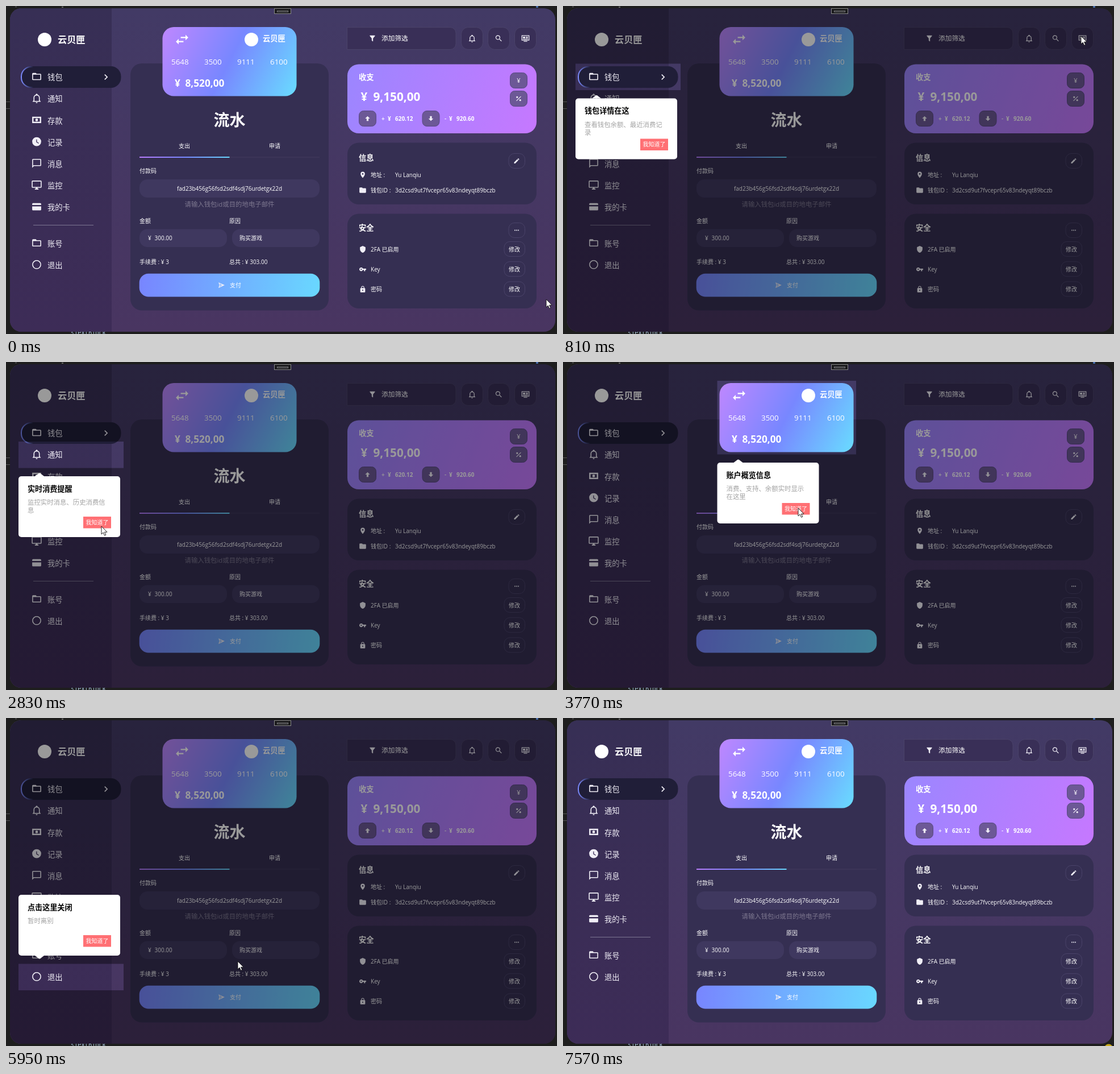
Recreate the animation shown at these times as an HTML page. Size 970 by 577 pixels, loop 7710 ms.

```html
<!DOCTYPE html>
<html lang="zh-CN">
<head>
<meta charset="utf-8">
<style>
html, body { margin: 0; width: 100%; height: 100%; overflow: hidden; background: #1e1e1e; }
svg { display: block; font-family: 'Open Sans', 'Noto Sans CJK SC', 'Noto Sans CJK', sans-serif; white-space: pre; }
</style>
</head>
<body>
<svg id="stage" width="970" height="577" viewBox="0 0 970 577">
  <defs>
    <linearGradient id="win" x2="0" y2="1"><stop stop-color="#423a65"/><stop offset="1" stop-color="#493561"/></linearGradient>
    <linearGradient id="side" x2="0" y2="1"><stop stop-color="#372f55"/><stop offset="1" stop-color="#3d2c57"/></linearGradient>
    <linearGradient id="card" gradientUnits="userSpaceOnUse" x1="275" y1="37" x2="511" y2="158"><stop stop-color="#bf87ff"/><stop offset=".5" stop-color="#7887ff"/><stop offset="1" stop-color="#69dcff"/></linearGradient>
    <linearGradient id="tab"><stop stop-color="#b97dff"/><stop offset=".5" stop-color="#7887ff"/><stop offset="1" stop-color="#69d8ff"/></linearGradient>
    <linearGradient id="pay" gradientUnits="userSpaceOnUse" x1="235" y1="471" x2="552" y2="511"><stop stop-color="#7885ff"/><stop offset="1" stop-color="#69d8ff"/></linearGradient>
    <linearGradient id="flow" gradientUnits="userSpaceOnUse" x1="601" y1="102" x2="934" y2="224"><stop stop-color="#9b86ff"/><stop offset="1" stop-color="#c678ff"/></linearGradient>
    <linearGradient id="edge"><stop stop-color="#7d8cff"/><stop offset=".12" stop-color="#7d8cff" stop-opacity="0"/></linearGradient>
  </defs>
</svg>
<script>
const stage = document.getElementById('stage');
const PANEL = '#352f52', LINE = '#4a4369', LIGHT = '#f1eff7';

function add(tag, attrs, parent = stage) {
  const el = document.createElementNS('http://www.w3.org/2000/svg', tag);
  for (const k in attrs) el.setAttribute(k, attrs[k]);
  parent.append(el);
  return el;
}
const rect = (x, y, width, height, rx, fill, stroke = 'none', parent) =>
  add('rect', { x, y, width, height, rx, fill, stroke }, parent);
// y is the vertical middle of the glyphs
function text(x, y, str, size = 10, weight = 500, fill = '#fff', parent, anchor = 'start') {
  const el = add('text', { x, y: y + size * .37, 'font-size': size, 'font-weight': weight, fill, 'text-anchor': anchor }, parent);
  el.textContent = str;
  return el;
}
const centered = (x, y, str, size, weight, fill) => text(x, y, str, size, weight, fill, stage, 'middle');
// icons live on a 24-unit grid
const icon = (d, cx, cy, size, fill = LIGHT) =>
  add('path', { d, fill, 'fill-rule': 'evenodd', transform: `translate(${cx - size / 2} ${cy - size / 2}) scale(${size / 24})` });

const ICON = {
  folder: 'M10 4H4a2 2 0 0 0-2 2v12a2 2 0 0 0 2 2h16a2 2 0 0 0 2-2V8a2 2 0 0 0-2-2h-8z',
  bell: 'M10 21h4a2 2 0 0 1-4 0M21 19v1H3v-1l2-2v-6c0-3.1 2-5.8 5-6.7V4a2 2 0 0 1 4 0v.3c3 .9 5 3.6 5 6.7v6zM17 11a5 5 0 0 0-10 0v7h10z',
  cash: 'M2 5h20v14H2zM5 8v8h14V8zM12 9a3 3 0 1 1 0 6a3 3 0 0 1 0-6z',
  clock: 'M12 2a10 10 0 1 0 0 20a10 10 0 0 0 0-20zM11 7h1.6v5.2l4.4 2.7-.8 1.3L11 13z',
  chat: 'M20 2H4a2 2 0 0 0-2 2v18l4-4h14a2 2 0 0 0 2-2V4a2 2 0 0 0-2-2zM20 16H5.2L4 17.2V4h16z',
  screen: 'M21 2H3a2 2 0 0 0-2 2v12a2 2 0 0 0 2 2h7v2H8v2h8v-2h-2v-2h7a2 2 0 0 0 2-2V4a2 2 0 0 0-2-2zM21 16H3V4h18z',
  bank: 'M4 4h16a2 2 0 0 1 2 2v12a2 2 0 0 1-2 2H4a2 2 0 0 1-2-2V6a2 2 0 0 1 2-2zM2 8v3h20V8z',
  ring: 'M12 2a10 10 0 1 0 0 20a10 10 0 0 0 0-20zM12 4a8 8 0 1 1 0 16a8 8 0 0 1 0-16z',
  filter: 'M14 12v7.9a1 1 0 0 1-1.7.7l-2-2a1 1 0 0 1-.3-.7V12L4.2 4.6A1 1 0 0 1 5 3h14a1 1 0 0 1 .8 1.6z',
  search: 'M9.5 3A6.5 6.5 0 0 1 16 9.5c0 1.6-.6 3.1-1.6 4.2l.3.3h.8l5 5-1.5 1.5-5-5v-.8l-.3-.3A6.5 6.5 0 1 1 9.5 3zM9.5 5a4.5 4.5 0 1 0 0 9a4.5 4.5 0 0 0 0-9z',
  swap: 'M21 9l-4-4v3h-7v2h7v3zM7 11l-4 4l4 4v-3h7v-2H7z',
  percent: 'M18.5 4L20 5.5 5.5 20 4 18.5zM7 4a3 3 0 1 1 0 6a3 3 0 0 1 0-6zM17 14a3 3 0 1 1 0 6a3 3 0 0 1 0-6z',
  up: 'M15 20H9v-8H4.2L12 4.2 19.8 12H15z',
  down: 'M9 4h6v8h4.8L12 19.8 4.2 12H9z',
  pencil: 'M20.7 7a1 1 0 0 0 0-1.4l-2.3-2.3a1 1 0 0 0-1.4 0l-1.9 1.8 3.8 3.8zM3 17.2V21h3.8L17.8 9.9 14 6.1z',
  pin: 'M12 2a7 7 0 0 0-7 7c0 5.2 7 13 7 13s7-7.8 7-13a7 7 0 0 0-7-7zM12 6.5a2.5 2.5 0 1 1 0 5a2.5 2.5 0 0 1 0-5z',
  shield: 'M12 1L3 5v6c0 5.6 3.8 10.7 9 12 5.2-1.3 9-6.4 9-12V5z',
  key: 'M12.6 10A6 6 0 1 0 12.6 14H16v4h4v-4h3v-4zM7 10a2 2 0 1 1 0 4a2 2 0 0 1 0-4z',
  lock: 'M18 8a2 2 0 0 1 2 2v10a2 2 0 0 1-2 2H6a2 2 0 0 1-2-2V10a2 2 0 0 1 2-2h1V6a5 5 0 0 1 10 0v2zM12 3a3 3 0 0 0-3 3v2h6V6a3 3 0 0 0-3-3zM12 13a2 2 0 1 0 0 4a2 2 0 0 0 0-4z',
  send: 'M2 3l20 9-20 9 3-9zM5.5 7l1.3 4H14zM6.8 13l-1.3 4L14 13z',
  chevron: 'M8.6 16.6l4.6-4.6-4.6-4.6L10 6l6 6-6 6z'
};
const folderLine = ICON.folder + 'M4 8v10h16V8z';

// surroundings and window
rect(0, 168, 8, 1, 0, '#555');
rect(0, 180, 8, 1, 0, '#555');
rect(16, 1, 3, 1, 0, '#666');
rect(98, 1, 3, 2, 0, '#666');
rect(933, 0, 4, 3, 1, '#4a6fb0');
add('text', { x: 114, y: 578, 'font-size': 10.3, fill: '#a9c4dc', style: "font-family:'Noto Sans Mono',monospace" }).textContent = '<TextBlock';
rect(7, 4, 960, 569, 20, 'url(#win)');
add('path', { d: 'M186 4H27a20 20 0 0 0-20 20V553a20 20 0 0 0 20 20H186z', fill: 'url(#side)' });

// sidebar
add('circle', { cx: 68, cy: 59, r: 12, fill: '#fff' });
text(91, 59.5, '云贝匣', 16.2, 700);
rect(26, 106, 176.5, 38, 18, '#201e38');
add('rect', { x: 27, y: 107, width: 174.5, height: 36, rx: 17, fill: 'none', stroke: 'url(#edge)', 'stroke-width': 2 });
icon(ICON.chevron, 176, 125, 20);
[['钱包', folderLine], ['通知', ICON.bell], ['存款', ICON.cash], ['记录', ICON.clock], ['消息', ICON.chat],
 ['监控', ICON.screen], ['我的卡', ICON.bank], ['账号', folderLine], ['退出', ICON.ring]].forEach(([label, d], i) => {
  const y = i < 7 ? 125.3 + i * 38.2 : 418 + (i - 7) * 38.2;
  icon(d, 54, y - 1.3, 19);
  text(73, y, label, 13.3, 400, LIGHT);
});
rect(48, 385, 106, 1, 0, '#7d7692');

// payment panel
rect(219, 101, 349, 434.5, 20, PANEL);
rect(275.5, 37, 236, 121.5, 20, 'url(#card)');
icon(ICON.swap, 310, 59, 29, '#fff');
add('circle', { cx: 432, cy: 59, r: 12, fill: '#fff' });
text(452, 57.5, '云贝匣', 13.3, 700);
['5648', '3500', '9111', '6100'].forEach((s, i) => text(291 + i * 58, 98, s, 13.4, 400));
text(297, 136, '¥', 17.2, 700);
text(315.5, 136, '8,520,00', 17.2, 700);
centered(393.5, 200.7, '流水', 28, 700);
centered(314, 246, '支出');
centered(473, 246, '申请');
rect(235, 265.5, 317, 1, 0, '#443d5e');
rect(235, 265, 158.5, 2, 0, 'url(#tab)');
text(235, 290.5, '付款码');
rect(235, 305, 317, 32, 14, '#3f385f');
centered(393.5, 321.5, 'fad23b456g56fsd2sdf4sdj76urdetgx22d');
centered(393.5, 349, '请输入钱包id或目的地电子邮件', 11.4, 400, '#7d778f');
text(235, 378.5, '金额');
text(393, 378.5, '原因');
rect(235, 392.5, 154, 31.5, 14, '#3f385f');
rect(398, 392.5, 154, 31.5, 14, '#3f385f');
text(250, 408.5, '¥');
text(261.5, 408.5, '300.00');
text(411, 408.5, '购买游戏');
text(235, 450, '手续费 : ¥ 3');
text(393, 450, '总共 : ¥ 303.00');
rect(234.7, 470.7, 317.6, 40.8, 16, 'url(#pay)');
icon(ICON.send, 379.5, 491, 13);
text(394, 491, '支付');

// toolbar
add('path', { d: 'M600.5 37.5H782a10 10 0 0 1 10 10V66.5a10 10 0 0 1-10 10H600.5z', fill: '#392f57', stroke: LINE });
icon(ICON.filter, 645, 57, 14);
text(661, 57, '添加筛选', 11.7, 400);
[801.5, 848.5, 895.5].forEach(x => rect(x, 37.5, 38, 39, 12, '#392f57', LINE));
icon(ICON.bell, 820.5, 57, 15);
icon(ICON.search, 867.5, 57, 15);
icon('M1 3h22v15H1zM3 5v11h18V5zM5 7h6v5H5zM13 7h6v2h-6zM13 10h6v2h-6zM5 13h14v1.6H5zM7 19h10v2H7z', 914.5, 57, 15);

// income and spending
rect(601, 102.5, 333, 121.5, 20, 'url(#flow)');
text(621, 125.5, '收支', 13.3, 700);
text(624.5, 159.5, '¥', 20.7, 700);
text(646.5, 159.5, '9,150,00', 20.7, 700);
[[887, 117], [887, 149], [621, 184], [732.5, 184]].forEach(([x, y]) => rect(x + .5, y + .5, 30, 27, 8, '#6c5896', '#584883'));
centered(902.5, 131, '¥', 11);
icon(ICON.percent, 902.5, 163, 13);
icon(ICON.up, 636.5, 198, 13);
icon(ICON.down, 748, 198, 13);
[[661, 672, 685, '+', '620.12'], [772, 780, 793, '-', '920.60']].forEach(([a, b, c, sign, sum]) => {
  text(a, 198.5, sign, 10, 600);
  text(b, 198.5, '¥', 10, 700);
  text(c, 198.5, sum, 10, 700);
});

// information
rect(601, 240.5, 333, 108.5, 20, PANEL);
text(621, 267.5, '信息', 13.3, 700);
rect(885, 259.5, 28.5, 26, 10, PANEL, LINE);
icon(ICON.pencil, 899, 272.5, 12);
icon(ICON.pin, 628, 297, 13);
text(642, 297.5, '地址 :');
text(685, 297.5, 'Yu Lanqiu');
icon(ICON.folder, 628, 324, 14);
text(642, 324, '钱包ID :');
text(685, 324, '3d2csd9ut7fvcepr65v83ndeyqt89bczb');

// security
rect(601, 365.5, 333, 166.5, 20, PANEL);
text(621, 390.5, '安全', 13.3, 700);
rect(885, 381.5, 28.5, 26, 10, PANEL, LINE);
[896, 899, 902].forEach(cx => add('circle', { cx, cy: 394.5, r: 1, fill: LIGHT }));
[['2FA 已启用', ICON.shield], ['Key', ICON.key], ['密码', ICON.lock]].forEach(([label, d], i) => {
  const y = 428 + i * 35.2;
  icon(d, 628, y, 13);
  text(642, y, label);
  rect(877, y - 13.5, 36.5, 26, 10, PANEL, LINE);
  centered(895, y, '修改');
});

// guide: start, highlighted box, tip above it, wording
const STEPS = [
  [790, 22, 101.5, 185, 46.5, 0, '钱包详情在这', '查看钱包余额、最近消费记', '录'],
  [1900, 22, 140, 185, 46.5, 0, '实时消费提醒', '监控实时消息、历史消费信', '息'],
  [2950, 271.5, 33, 244.5, 129.5, 0, '账户概览信息', '消费、支持、余额实时显示', '在这里'],
  [3830, 231, 467, 325, 48.5, 1, '快捷支付', '确认金额以后，点击这里完', '成支付'],
  [4600, 597, 361.5, 341, 174.5, 1, '账户安全', '这里修改您的安全信息，要', '慎重哦'],
  [5400, 22, 432.5, 185, 46.5, 1, '点击这里关闭', '暂时离别', '']
];
const GUIDE_END = 6960, TIP_W = 179, TIP_H = 107, GAP = 14.5;
const WINDOW = 'M27 4H947a20 20 0 0 1 20 20V553a20 20 0 0 1-20 20H27a20 20 0 0 1-20-20V24a20 20 0 0 1 20-20z';

const guides = STEPS.map(([, x, y, w, h, above, title, line1, line2]) => {
  const g = add('g', {});
  add('path', { d: `${WINDOW}M${x} ${y}h${w}v${h}h${-w}z`, 'fill-rule': 'evenodd', opacity: .4 }, g);
  const top = above ? y - GAP - TIP_H : y + h + GAP;
  const tip = add('g', { transform: `translate(${x} ${top})` }, g);
  add('path', {
    d: above ? `M29 ${TIP_H}l6.5 5q1.5 1 3 0l6.5-5z` : 'M29 0l6.5-5q1.5-1 3 0l6.5 5z', fill: '#fff'
  }, tip);
  rect(0, 0, TIP_W, TIP_H, 5, '#fff', 'none', tip);
  text(16, 22, title, 13.1, 700, '#000', tip);
  text(16, 46, line1, 11.4, 400, '#a3a3a3', tip);
  text(16, 60, line2, 11.4, 400, '#a3a3a3', tip);
  rect(114, 71, 49, 20.5, 0, '#ff7074', 'none', tip);
  text(138.5, 81, '我知道了', 10, 500, '#fff', tip, 'middle');
  return g;
});

rect(472.5, 4.5, 29, 9, 0, '#1a1a1c', '#8a8a8a');
rect(477.5, 8.5, 19, 2, 0, 'none', '#77777a');
const dot = add('circle', { cx: 960.5, cy: 581, r: 7.5, fill: '#c8a91c' });
const cursor = add('path', { d: 'M0 0V14l3.2-3 2.3 5.2 2.3-1-2.3-5H10z', fill: '#fff', stroke: '#111', 'stroke-width': .9 });

// pointer stops: time, x, y
const PATH = [
  [70, 951, 516], [700, 912, 53], [850, 912, 53], [1450, 166, 269], [1640, 162, 246], [1900, 162, 246],
  [2150, 162, 302], [2430, 158, 279], [2530, 158, 279], [2690, 168, 289], [2900, 168, 289], [3060, 170, 302],
  [3570, 410, 256], [3680, 410, 256], [3750, 414, 257], [3850, 414, 257], [4420, 377, 430], [4860, 377, 430],
  [5270, 735, 323], [5400, 735, 323], [6090, 369, 440], [6130, 369, 440], [6620, 163, 392], [6780, 163, 392],
  [6840, 182, 398], [6960, 182, 398], [7100, 260, 470]
];
function pointer(t) {
  const i = PATH.findIndex(p => p[0] > t);
  if (i === 0) return PATH[0].slice(1);
  if (i < 0) return null;
  const [t0, x0, y0] = PATH[i - 1], [t1, x1, y1] = PATH[i];
  const u = (t - t0) / (t1 - t0), e = u * u * (3 - 2 * u);
  return [x0 + (x1 - x0) * e, y0 + (y1 - y0) * e];
}
const show = (el, on) => el.setAttribute('visibility', on ? 'visible' : 'hidden');

function draw(now) {
  const t = now % 7710;
  guides.forEach((g, i) => {
    const end = i + 1 < STEPS.length ? STEPS[i + 1][0] : GUIDE_END;
    show(g, t >= STEPS[i][0] && t < end);
  });
  const pos = pointer(t);
  show(cursor, pos);
  if (pos) cursor.setAttribute('transform', `translate(${pos.map(Math.round)})`);
  show(dot, t >= 7570);
}
const start = performance.now();
function tick() {
  draw(performance.now() - start);
  requestAnimationFrame(tick);
}
tick();
</script>
</body>
</html>
```
